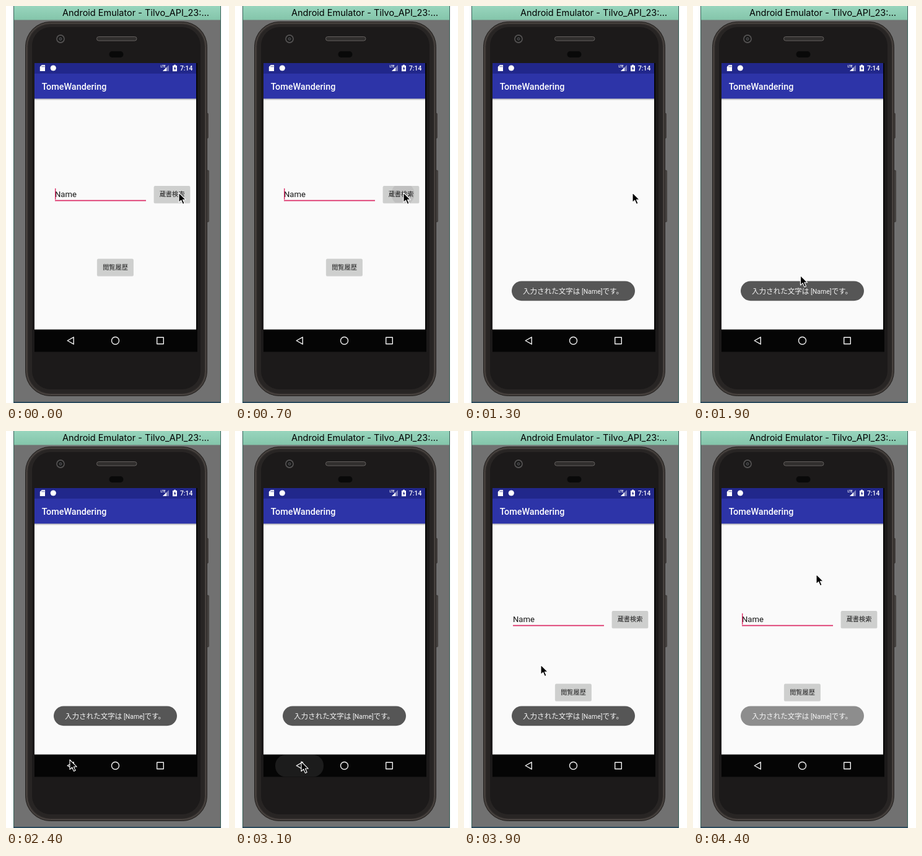
An HTML page for the animation above (4.5 s loop, 360x640 px).

```html
<!DOCTYPE html>
<html lang="ja">
<head>
<meta charset="utf-8">
<title>Emulator demo</title>
<style>
  html, body { margin: 0; width: 100%; height: 100%; overflow: hidden; background: #fff; }
  svg { display: block; width: 100%; height: 100%; }
  text { font-family: Roboto, "Noto Sans CJK JP", "Noto Sans CJK", sans-serif; }
  .window-title { font: 14.5px Inter, sans-serif; }
  .label { font-size: 10.2px; fill: #1d1d1d; font-weight: 500; text-anchor: middle; }
</style>
</head>
<body>
<svg viewBox="0 0 360 640" xmlns="http://www.w3.org/2000/svg">
  <defs>
    <linearGradient id="bar" x2="0" y2="1">
      <stop offset="0" stop-color="#98d5bd"/><stop offset="1" stop-color="#84c5aa"/>
    </linearGradient>
    <linearGradient id="shade" x2="0" y2="1">
      <stop offset="0" stop-color="#000" stop-opacity=".28"/><stop offset="1" stop-color="#000" stop-opacity="0"/>
    </linearGradient>
    <clipPath id="searchClip"><rect x="239" y="290" width="58" height="27" rx="1.5"/></clipPath>
    <clipPath id="navClip"><rect x="46" y="522" width="263" height="35.5"/></clipPath>
  </defs>

  <!-- Window -->
  <rect x="12" width="335" height="640" fill="#717171"/>
  <rect x="12" width="335" height="22.5" fill="url(#bar)"/>
  <path d="M12.5 0V640M346.5 0V640" stroke="#356057"/>
  <rect x="12" y="638" width="335" height="2" fill="#2b4a5c"/>
  <text class="window-title" x="91" y="16">Android Emulator - Tilvo_API_23:…</text>

  <!-- Phone -->
  <g fill="#4a4644" stroke="#302c2a" stroke-width=".7">
    <rect x="322" y="173" width="4.4" height="40" rx="1"/>
    <rect x="322" y="265" width="5.4" height="83" rx="1"/>
  </g>
  <rect x="31.5" y="25.5" width="293" height="603" rx="40" fill="#373331" stroke="#292624"/>
  <rect x="33.5" y="27.5" width="289" height="599" rx="38" fill="none" stroke="#544d49"/>
  <rect x="35.5" y="29.5" width="285" height="595" rx="36" fill="#282524"/>
  <rect x="42" y="34" width="272" height="584" rx="30" fill="#1c1a1a"/>
  <circle cx="88" cy="53" r="6" fill="#161616" stroke="#525050" stroke-width="1.8"/>
  <circle cx="88" cy="53" r="2.2" fill="#2b2b2e" stroke="#555"/>
  <rect x="146.5" y="49.5" width="64.5" height="6.5" rx="3.2" fill="#302e2d" stroke="#64605e"/>
  <rect x="166.5" y="73" width="23" height="10" rx="5" fill="#090909"/>

  <!-- App -->
  <rect x="46" y="92" width="263" height="465.5" fill="#050505"/>
  <rect x="46" y="92" width="261" height="429.5" fill="#fafafa"/>
  <g id="form">
    <text x="79" y="308" font-size="13.1" fill="#161616">Name</text>
    <path d="M79 313.6H226" stroke="#dc2f68" stroke-width="1.6"/>
    <rect id="caret" x="79" y="294" width="1.4" height="18" fill="#dc2f68"/>
    <g id="buttons"></g>
    <circle id="press" cx="271" cy="303" clip-path="url(#searchClip)" fill="#000"/>
    <text class="label" x="268" y="307">蔵書検索</text>
    <text class="label" x="176.5" y="424.7">閲覧履歴</text>
  </g>
  <rect x="46" y="92" width="261" height="17" fill="#21278b"/>
  <rect x="46" y="109" width="261" height="40.4" fill="#2d34a8"/>
  <rect x="46" y="149.4" width="261" height="3" fill="url(#shade)"/>
  <text x="57.7" y="135" font-size="14.4" font-weight="500" fill="#fff">TomeWandering</text>

  <!-- Status icons -->
  <g fill="#fff">
    <path d="M57.8 95H63V105H54.8V98Z"/>
    <path d="M58 96.5v2M59.8 96.5v2M61.5 96.5v2" stroke="#21278b" stroke-width=".7"/>
    <circle cx="76.3" cy="100" r="4.6"/>
    <text x="249.5" y="99" font-size="5" font-weight="700">LTE</text>
    <path d="M263 95V105H253Z" opacity=".4"/>
    <path d="M259 99V105H253Z"/>
    <path d="M269 96H271V94.7H274V96H276V105.2H269Z"/>
    <path d="M273.2 97.3L270.7 101.2H272.3V104L274.6 100.2H273.2Z" fill="#21278b"/>
    <text x="281" y="104" font-size="10.3" font-weight="500">7:14</text>
  </g>

  <!-- Navigation bar -->
  <rect id="navPress" y="522" height="35.5" rx="17" fill="#fff" clip-path="url(#navClip)"/>
  <g fill="none" stroke="#f2f2f2" stroke-width="1.4" stroke-linejoin="round">
    <path d="M99.2 539.5L109.2 533.8V545.2Z"/>
    <circle cx="176.5" cy="539.5" r="6"/>
    <rect x="243.7" y="534.2" width="10.6" height="10.6"/>
  </g>

  <g id="toast">
    <rect x="77" y="443.5" width="199" height="31.7" rx="15.85" fill="#515151"/>
    <g fill="#f4f4f4" font-size="11.55">
      <text x="95" y="463.7">入力された文字は</text>
      <text x="190" y="463.5" font-size="10.5">[Name]</text>
      <text x="223.5" y="463.7">です。</text>
    </g>
  </g>

  <path id="cursor" d="M0 0V15.6L3.7 12.2L6.4 18.4L9.1 17.2L6.4 11.3H11.3Z" fill="#000" stroke="#fff" stroke-width="1.1" stroke-linejoin="round"/>
</svg>
<script>
const LOOP = 4500, STEP = 100;
const $ = id => document.getElementById(id);
const set = (id, attrs) => {
  for (const [key, value] of Object.entries(attrs)) $(id).setAttribute(key, value);
};
const ramp = (t, from, to) => Math.min(1, Math.max(0, (t - from) / (to - from)));
const ease = p => p * p * (3 - 2 * p);

const button = (x, y, w) => `
  <rect x="${x - .4}" y="${y + .6}" width="${w + .8}" height="27.6" rx="2" fill="#000" opacity=".16"/>
  <rect x="${x}" y="${y}" width="${w}" height="27" rx="1.5" fill="#cecfce"/>`;
$('buttons').innerHTML = button(239, 290, 58) + button(147.3, 407.5, 58.2);

// Pointer stops: time, x, y
const stops = [
  [0, 279, 301], [400, 272, 301], [1400, 272, 301], [2300, 103, 530],
  [2600, 103, 530], [2900, 107, 533], [3300, 107, 533],
  [3900, 124, 377], [4400, 199, 231]
];

function pointer(t) {
  const i = stops.findIndex(s => s[0] > t);
  if (i < 0) return stops[stops.length - 1].slice(1);
  const [t0, x0, y0] = stops[i - 1], [t1, x1, y1] = stops[i];
  const p = ease(ramp(t, t0, t1));
  return [x0 + (x1 - x0) * p, y0 + (y1 - y0) * p];
}

const caretOn = t => t < 200 || (t >= 700 && t < 1200) || (t >= 3400 && t < 3900) || t >= 4400;

function draw(t) {
  const press = ramp(t, 600, 900);
  const navPress = ramp(t, 2800, 3100);
  const navWidth = 30 + 48 * navPress;

  set('form', { opacity: 1 - ramp(t, 900, 1200) + ramp(t, 3300, 3600) });
  set('caret', { opacity: caretOn(t) ? 1 : 0 });
  set('press', { r: 10 + 26 * press, opacity: t >= 700 ? .07 * (1 - ramp(t, 900, 1100)) : 0 });
  set('navPress', {
    x: 104 - navWidth / 2, width: navWidth,
    opacity: t >= 2900 ? .09 * (1 - ramp(t, 3200, 3500)) : 0
  });
  set('toast', { opacity: .97 * ramp(t, 1000, 1300) * (1 - .34 * ramp(t, 4200, 4400)) });
  set('cursor', { transform: `translate(${pointer(t)})` });
}

const start = performance.now();
function tick(now) {
  const t = Math.max(0, now - start) % LOOP;
  draw(Math.floor(t / STEP) * STEP);
  requestAnimationFrame(tick);
}
draw(0);
requestAnimationFrame(tick);
</script>
</body>
</html>
```
